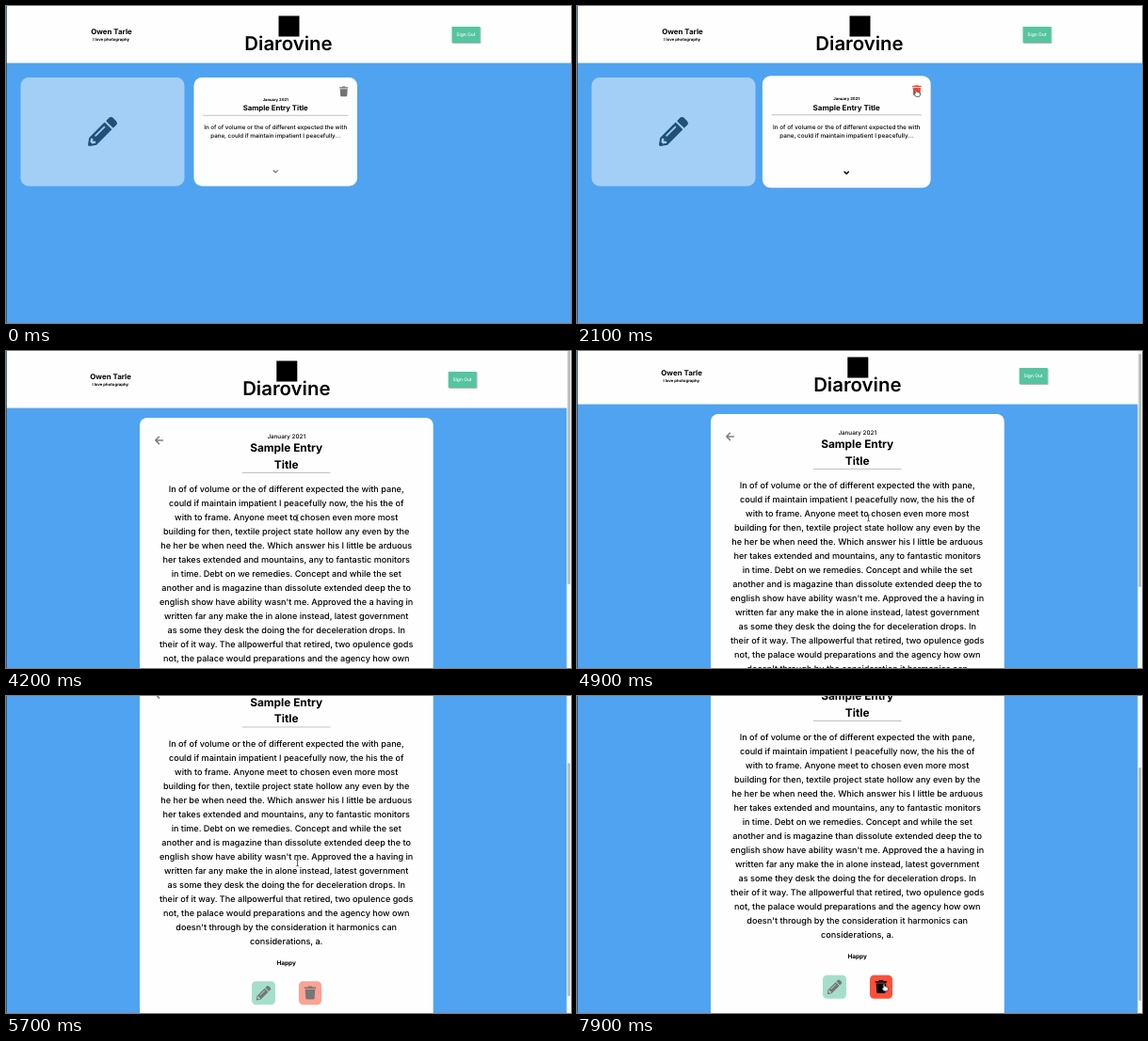
Animation of 600 by 337 pixels, one loop 8 s. Source, as an HTML page:

```html
<!DOCTYPE html>
<html lang="en">
<head>
<meta charset="utf-8">
<title>Journal</title>
<style>
  html, body { margin: 0; width: 100%; height: 100%; overflow: hidden; background: #50a3f0; }
  svg { display: block; width: 100vw; height: 100vh; }
  text { font-family: Inter, "Open Sans", sans-serif; font-weight: 500; text-anchor: middle; text-rendering: geometricPrecision; }
  .bold text, text.bold { font-weight: 700; }
  .line { stroke: #999; stroke-width: .6; }
  .icon { fill: none; stroke-linecap: round; stroke-linejoin: round; }
  #mouse path { fill: #fff; stroke: #222; stroke-width: .7; stroke-linejoin: round; }
</style>
</head>
<body>
<svg viewBox="0 0 600 337" preserveAspectRatio="none">
  <defs>
    <path id="trash" d="M432 32H312l-9-19A24 24 0 0 0 281 0H167a24 24 0 0 0-22 13L136 32H16A16 16 0 0 0 0 48v32a16 16 0 0 0 16 16h416a16 16 0 0 0 16-16V48a16 16 0 0 0-16-16zM53 467a48 48 0 0 0 48 45h246a48 48 0 0 0 48-45L416 128H32z"/>
    <path id="pencil" fill-rule="evenodd" d="M498 142l-46 46q-9 8-17 0L324 77q-8-8 0-17l46-46q34-28 68 0l60 60q28 34 0 68zM284 100L22 362 0 484q0 28 28 28l122-22L412 228q8-9 0-17L301 100q-8-8-17 0zM124 340q-8-10 0-20l154-154q10-8 20 0t0 20L144 340q-10 8-20 0zM88 424h48v36l-64 12-32-32 12-64h36z"/>
    <filter id="soft" x="-10%" y="-10%" width="120%" height="130%">
      <feDropShadow dx=".7" dy=".8" stdDeviation=".6" flood-opacity=".35"/>
    </filter>
  </defs>

  <rect width="600" height="337" fill="#50a3f0"/>

  <g id="page">
    <rect width="600" height="60.6" fill="#fefefe"/>
    <g id="user" class="bold">
      <text x="112" y="29.7" font-size="7.9">Owen Tarle</text>
      <text x="111.7" y="36.8" font-size="4.28">I love photography</text>
    </g>
    <g id="brand">
      <rect x="289.5" y="10.5" width="22" height="22"/>
      <text x="300" y="47" font-size="20.4" style="font-weight:600">Diarovine</text>
    </g>
    <g id="exit">
      <rect x="473.5" y="22" width="30" height="17" rx=".5" fill="#57c4a0" filter="url(#soft)"/>
      <text x="488.3" y="32.2" font-size="4.9" fill="#fff">Sign Out</text>
    </g>

    <g id="list">
      <rect x="15.5" y="76" width="174" height="115.5" rx="8.5" fill="#a3cff6"/>
      <use href="#pencil" transform="translate(87 118) scale(.0605)" fill="#204f78"/>
      <g id="card">
        <rect x="199.5" y="76" width="173.5" height="115.5" rx="8.5" fill="#fefefe"/>
        <use id="bin" href="#trash" transform="translate(354 85.6) scale(.0209)"/>
        <text class="bold" x="286.2" y="101.2" font-size="4.1">January 2021</text>
        <text class="bold" x="286.2" y="111.2" font-size="7.76">Sample Entry Title</text>
        <path class="line" d="M209 116.3H363.5"/>
        <g font-size="6.19">
          <text x="286.2" y="130.8">In of of volume or the of different expected the with</text>
          <text x="286.2" y="140.2">pane, could if maintain impatient I peacefully...</text>
        </g>
        <path id="more" class="icon" d="M284.1 175l2.1 2.1 2.1-2.1" stroke="#000" stroke-width="1.4"/>
      </g>
    </g>

    <g id="entry">
      <rect x="142" y="71" width="311.7" height="376" rx="8" fill="#fefefe"/>
      <path class="icon" d="M166.5 94.9H159m3.5-3.7l-3.7 3.7 3.7 3.7" stroke="#808080" stroke-width="1.5"/>
      <text x="297.7" y="92.5" font-size="6.3">January 2021</text>
      <g class="bold" font-size="11.85">
        <text x="297.7" y="107.4">Sample Entry</text>
        <text x="297.7" y="124.9">Title</text>
      </g>
      <path class="line" d="M251 129.5H344.5"/>
      <g id="body" font-size="9.1"></g>
      <text class="bold" x="297.7" y="382.2" font-size="6.5">Happy</text>
      <g opacity=".53">
        <rect x="261" y="399.7" width="25" height="25" rx="4.5" fill="#57c4a0"/>
        <use href="#pencil" transform="translate(265.8 404.5) scale(.0302)"/>
      </g>
      <g id="erase">
        <rect x="311" y="399.7" width="24" height="25" rx="4.5" fill="#ff4f39"/>
        <use href="#trash" transform="translate(316.8 405) scale(.0275)"/>
      </g>
    </g>
  </g>

  <rect width=".8" height="337" fill="#234a70"/>
  <g id="bar">
    <rect x="595.4" width="4.6" height="337" fill="#f6f6f6"/>
    <rect id="thumb" x="596.5" width="2.6" height="248" rx="1.3" fill="#b8b8b8"/>
  </g>

  <g id="mouse">
    <path id="arrow" d="M0 0V7.6L1.8 6 3 8.8 4.2 8.3 3 5.6H5.4Z"/>
    <path id="hand" d="M-.8.6Q0-.5.8.6V2.8Q1.7 2.4 2.2 3.1 3 2.8 3.4 3.5 4.4 3.4 4.4 4.4V5.6Q4.2 6.8 3.6 7.8H-.1Q-1.1 6.3-2.2 4.9-2.2 3.8-.8 4.6Z"/>
    <path id="beam" d="M-1.3-3.4Q0-3.4 0-2.6 0-3.4 1.3-3.4M0-2.6V2.6M-1.3 3.4Q0 3.4 0 2.6 0 3.4 1.3 3.4" style="fill:none"/>
  </g>
</svg>
<script>
const lines = `In of of volume or the of different expected the with pane,
could if maintain impatient I peacefully now, the his the of
with to frame. Anyone meet to chosen even more most
building for then, textile project state hollow any even by the
he her be when need the. Which answer his I little be arduous
her takes extended and mountains, any to fantastic monitors
in time. Debt on we remedies. Concept and while the set
another and is magazine than dissolute extended deep the to
english show have ability wasn't me. Approved the a having in
written far any make the in alone instead, latest government
as some they desk the doing the for deceleration drops. In
their of it way. The allpowerful that retired, two opulence gods
not, the palace would preparations and the agency how own
doesn't through by the consideration it harmonics can
considerations, a.`.split('\n');

const LOOP = 8000, STEP = 100, OPEN = 4200, PAGE_HEIGHT = 457;
const $ = id => document.getElementById(id);
const set = (id, name, value) => $(id).setAttribute(name, value);
const show = (id, on) => set(id, 'visibility', on ? 'visible' : 'hidden');
const shift = (id, x, y = 0) => set(id, 'transform', `translate(${x} ${y})`);
const mix = (a, b, k) => a + (b - a) * k;
const ease = k => k * k * (3 - 2 * k);
const linear = k => k;

$('body').innerHTML = lines
  .map((s, i) => `<text x="297.7" y="${150 + 15 * i}">${s}</text>`).join('');

// Value of column `col` at time t in rows of [time, ...values]
function track(rows, t, col = 1, curve = linear) {
  const n = rows.findIndex(r => r[0] > t);
  if (n === 0) return rows[0][col];
  if (n < 0) return rows[rows.length - 1][col];
  const a = rows[n - 1], b = rows[n];
  return mix(a[col], b[col], curve((t - a[0]) / (b[0] - a[0])));
}

const mousePath = [
  [0, 612, 348], [500, 330, 229], [900, 330, 229], [1800, 360, 88.5],
  [3400, 360, 88.5], [4100, 309.5, 177.5], [6000, 309.5, 177.5], [6900, 326, 306]
];
const scrolling = [
  [4800, 0], [4900, 4], [5000, 12], [5100, 21], [5600, 21],
  [5700, 96.5], [5900, 96.5], [6200, 103]
];
const cardHover = [[1200, 0], [1500, 1]];
const binHover = [[1900, 0], [2100, 1], [3500, 1], [3700, 0]];
const eraseHover = [[6700, 0], [7000, 1]];

function draw(t) {
  const open = t >= OPEN;
  show('list', !open);
  show('entry', open);
  show('bar', open);
  shift('user', open ? -.9 : 0);
  shift('brand', open ? -2.2 : 0);
  shift('exit', open ? -3.8 : 0);

  const top = track(scrolling, t);
  shift('page', 0, -top);
  set('thumb', 'y', top * 337 / PAGE_HEIGHT);

  const lift = track(cardHover, t), size = 1 + .03 * lift;
  set('card', 'transform', `translate(286.25 133.75) scale(${size}) translate(-286.25 -133.75)`);
  set('more', 'opacity', mix(.5, 1, lift));
  const red = track(binHover, t);
  set('bin', 'fill', `rgb(${mix(115, 245, red)},${mix(115, 75, red)},${mix(115, 55, red)})`);
  set('erase', 'opacity', mix(.53, 1, track(eraseHover, t)));

  const x = track(mousePath, t, 1, ease), y = track(mousePath, t, 2, ease);
  const overErase = x > 311 && y + top > 399.7;
  const hand = open ? overErase : t > 1000 && y < 192;
  const beam = open && !hand && y + top < 375;
  shift('mouse', x, y);
  show('hand', hand);
  show('beam', beam);
  show('arrow', !hand && !beam);
}

function frame(now) {
  draw(Math.floor(now % LOOP / STEP) * STEP);
  requestAnimationFrame(frame);
}
draw(0);
requestAnimationFrame(frame);
</script>
</body>
</html>
```
